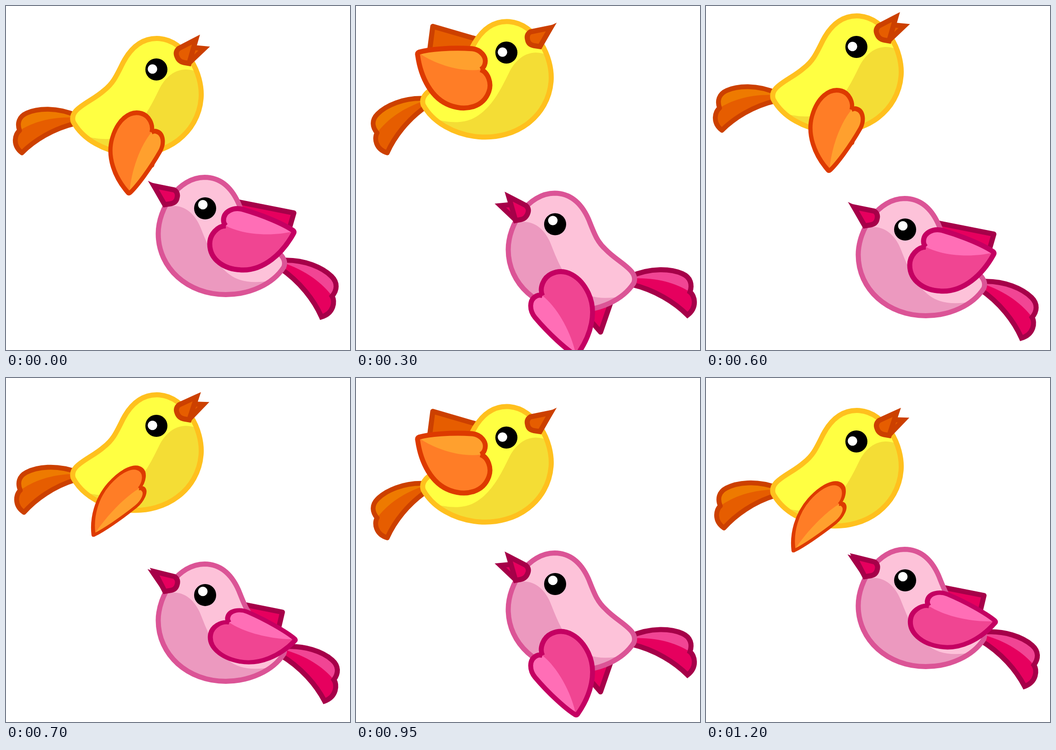
Recreate the animation shown at these times as an HTML page. Size 748x748 px, loop 1.25 s.

```html
<!DOCTYPE html>
<html lang="en">
<head>
<meta charset="utf-8">
<title>Two birds</title>
<style>
  html, body { margin: 0; width: 100%; height: 100%; overflow: hidden; background: #fff; }
  svg { display: block; width: 100vw; height: 100vh; stroke-width: 11; }
</style>
</head>
<body>
<svg id="stage" viewBox="0 0 748 748"></svg>
<script>
const STEP = 50, FRAMES = 25, FLAP = 12;

// Shapes face left; the yellow bird is mirrored.
const BODY = 'M432 372.5C470 373 492 398 506 430C518 460 524 478 543 495C562 515 588 528 600 544Q609 556 604 568' +
  'C580 605 530 627.5 478 627.5C395 627.5 331 570 331 495C331 440 375 372.5 432 372.5Z';
const BELLY = 'M340 440C375 425 408 442 424 484C440 525 455 560 485 583C510 602 540 603 578 597' +
  'C550 622 510 627.5 478 627.5C395 627.5 331 570 331 495Q331 465 340 440Z';
const TAIL_TOP = 'M598 553C650 550 690 570 708 588C722 602 720 618 709 631';
const TAIL = TAIL_TOP + 'C716 642 713 668 686 676C670 640 640 600 596 570Z';
const TAIL_LIGHT = TAIL_TOP + 'C690 605 655 575 598 557Z';
const WING_TOP = 'C130 -2 85 -22 39 -35C20 -40 -2 -31 -2 -11Q-2 -4 3 1';
const WING = 'M3 1C-15 1 -32 20 -32 40C-32 75 0 97 41 97C85 97 125 63 150 18Q153 14 149 11' + WING_TOP;
const WING_LIGHT = 'M3 1C40 20 100 25 150 13' + WING_TOP + 'Z';

// wing: Bézier control points of x, y, angle and width over one stroke
// root, corner, trail: the same for the far wing's outline
const yellow = {
  mirror: true, rise: -49, join: 'round', peak: 6, length: .95,
  bodyPlace: 'translate(-12 -302) rotate(-4.7 433 440)',
  beakPlace: 'translate(3 -307)', tailPlace: 'translate(21.5 -293) scale(.96)',
  eye: [421, 138], glint: [429.5, 137],
  open: swing => 1 - swing,
  body: '#ffff42', belly: '#f4dd35', edge: '#ffc01e',
  wingFill: '#ff7d26', wingLight: '#ffa02e', wingEdge: '#dd3a00',
  dark: '#e65d00', tailLight: '#ee7a00', darkEdge: '#cc4000',
  wing: [[430, 272, 74, -.82], [485, 290, 8, -.5], [528, 192, 46, .88], [474, 175, -20, 1]],
  root: [[424, 312], [440, 122]],
  corner: [[431, 346], [440, 270], [490, 200], [581, 81]],
  trail: [[445, 340], [590, 150]]
};
const pink = {
  rise: 46, join: 'miter', peak: 5.5, length: 1,
  bodyPlace: '', beakPlace: '', tailPlace: '',
  eye: [433, 440], glint: [428, 432],
  open: swing => swing,
  body: '#fdc2d9', belly: '#ec99bf', edge: '#db5496',
  wingFill: '#f04592', wingLight: '#ff6eb6', wingEdge: '#c40062',
  dark: '#e6005e', tailLight: '#f14594', darkEdge: '#a60049',
  wing: [[475, 477, 0, 1], [498, 505, 21, 1], [469, 605, 29, -1], [385, 592, 75, -1]],
  root: [[480, 421], [564, 615]],
  corner: [[626, 450], [575, 500], [555, 540], [525, 712]],
  trail: [[608, 512], [492, 650]]
};

const mix = (a, b, t) => a + (b - a) * t;

function bezier(points, t) {
  if (points.length === 1) return points[0];
  return bezier(points.slice(1).map((p, i) => p.map((v, j) => mix(points[i][j], v, t))), t);
}

// rises from 0 to 1 at the peak, then falls back to 0
const stroke = (k, peak) => k < peak ? k / peak : (FLAP - k) / (FLAP - peak);

const path = (d, fill, line = 'none') => `<path d="${d}" fill="${fill}" stroke="${line}"/>`;
const dot = ([x, y], r, fill) => `<circle cx="${x}" cy="${y}" r="${r}" fill="${fill}"/>`;
const group = (transform, content, join = 'miter') =>
  `<g transform="${transform}" stroke-linejoin="${join}">${content}</g>`;
const twoTone = (shape, fill, lightShape, light, line) =>
  path(shape, fill) + path(lightShape, light) + path(shape, 'none', line);

function beak(b, q) {
  const lower = `M${mix(323, 314, q)} ${mix(393, 399.5, q)}L346 430L356 424L340 ${mix(401, 397, q)}Z`;
  const upper = `M${mix(321.5, 332, q)} ${mix(391, 380, q)}L${366 + 3 * q} ${400 - q}` +
    `Q${375 + 2 * q} 406 ${372 + 2 * q} ${417 - 2 * q}Q370 428 358 430L${345 + 2 * q} 432Z`;
  return path(lower, b.dark, b.darkEdge) + path(upper, b.dark, b.darkEdge);
}

function bird(b, lift, k) {
  const beat = stroke(k, b.peak), q = b.open(stroke(k, FLAP / 2));
  const [x, y, angle, width] = bezier(b.wing, beat);
  const far = [b.root, b.corner, b.trail].map(points => bezier(points, beat).join(' '));
  const content =
    group('', path('M' + far.join('L'), b.dark, b.darkEdge), 'round') +
    group(`${b.tailPlace} rotate(${-21 * q} 600 563)`,
      twoTone(TAIL, b.dark, TAIL_LIGHT, b.tailLight, b.darkEdge), b.join) +
    group(b.bodyPlace, twoTone(BODY, b.body, BELLY, b.belly, b.edge)) +
    group(b.beakPlace, beak(b, q)) +
    dot(b.eye, 24, '#000') + dot(b.glint, 10.3, '#fff') +
    group(`translate(${x} ${y}) rotate(${angle}) scale(${b.length} ${width})`,
      twoTone(WING, b.wingFill, WING_LIGHT, b.wingLight, b.wingEdge), 'round');
  const flip = b.mirror ? 'translate(748 0) scale(-1 1)' : '';
  return group(`translate(0 ${b.rise * lift}) ${flip}`, content);
}

const stage = document.getElementById('stage');
let shown = -1;

function draw(now) {
  const frame = Math.floor(now / STEP) % FRAMES;
  if (frame !== shown) {
    shown = frame;
    // eases out towards the far end, then eases out on the way home
    const rest = (1 - (frame % 12) / 12) ** 2;
    const lift = frame < 12 ? 1 - rest : frame < 24 ? rest : 0;
    const k = frame % (FLAP + 1);
    stage.innerHTML = bird(yellow, lift, k) + bird(pink, lift, k);
  }
  requestAnimationFrame(draw);
}
draw(performance.now());
</script>
</body>
</html>
```
